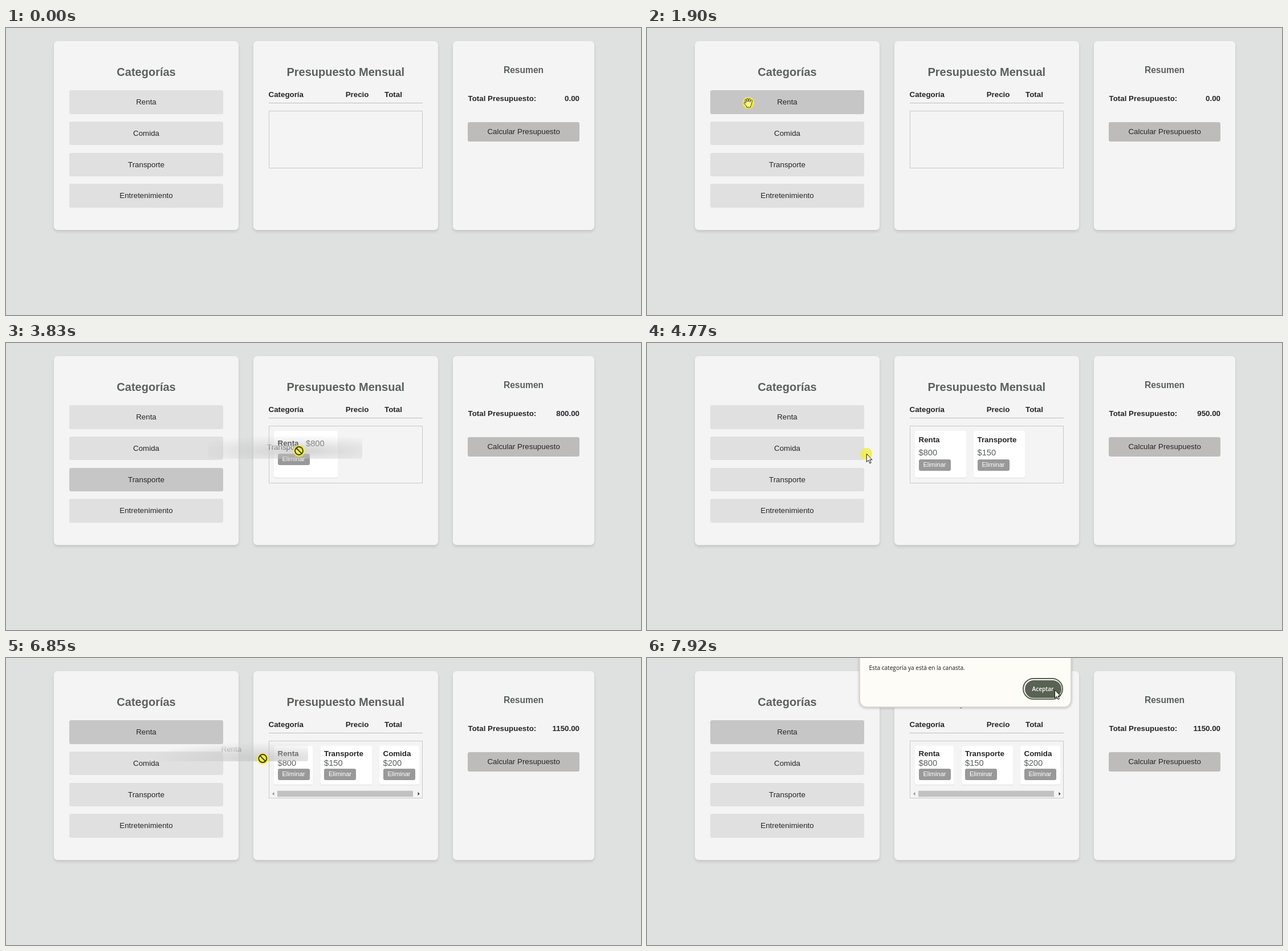
Animation, 1114 px wide and 503 px high, one loop 7.99 s. Source, as an HTML page:

```html
<!DOCTYPE html>
<html lang="es">
<head>
<meta charset="utf-8">
<title>Presupuesto</title>
<style>
html, body { margin: 0; width: 100%; height: 100%; overflow: hidden; }
body { background: #dfe1e0; color: #252528; font: 13.333px/16px "Liberation Sans", Arial, sans-serif; }
#stage { position: relative; width: 1114px; height: 503px; overflow: hidden; background: #dfe1e0; }
#stage div, #stage span, #stage svg { position: absolute; box-sizing: border-box; white-space: nowrap; }
.panel { top: 23.3px; width: 323.5px; height: 330.7px; border-radius: 6.7px; background: #f4f4f4; box-shadow: 0 3px 5px rgba(0,0,0,.12); }
.title { width: 100%; top: 42px; text-align: center; font: bold 20px/24px "Liberation Sans", Arial, sans-serif; color: #5b605d; }
.small { top: 38.5px; font-size: 15.6px; }
.row { left: 111px; width: 270px; height: 41.3px; border-radius: 3.3px; background: #e0e0e0; text-align: center; line-height: 41.3px; }
b { font-weight: bold; }
.head { top: 108.5px; font-weight: bold; }
.rule { left: 460.5px; top: 131px; width: 270.5px; height: 1px; background: #bdbdbd; }
.zone { left: 460.5px; top: 145px; width: 270.5px; height: 101px; border: 1px solid #c8c8c8; }
.calc { left: 810.4px; top: 164.7px; width: 195.5px; height: 34.5px; border-radius: 3.3px; background: #bdbcbb; text-align: center; line-height: 34.5px; }
#total { right: 108px; top: 116px; font-weight: bold; }
.card { top: 154px; border-radius: 3.3px; background: #fff; box-shadow: 0 1px 1px rgba(0,0,0,.1); }
.price { font-size: 14.667px; color: #5c5f5e; }
.del { left: 6.5px; width: 56px; height: 19.6px; border-radius: 3px; background: #999; color: #fff; font-size: 11.11px; line-height: 19.6px; text-align: center; }
#bar { left: 461.5px; top: 231px; width: 268.5px; height: 14px; }
#ghost { width: 270px; height: 41.3px; border-radius: 3.3px; background: #c4c4c4; text-align: center; line-height: 41.3px; }
#alert { left: 372px; top: -40px; width: 373px; height: 127px; border: 2px solid #d8d7d2; border-radius: 13px; background: #fdfcf7; box-shadow: 0 1px 4px rgba(0,0,0,.22); font: 10.1px/16px "Open Sans", "Noto Sans", sans-serif; color: #1c1c1a; }
#alert span { left: 15.5px; top: 47px; }
.ring { left: 285px; top: 73px; width: 71px; height: 38px; border: 2px solid #566050; border-radius: 19px; }
#ok { left: 1.5px; top: 1.5px; width: 64px; height: 31px; border-radius: 16px; color: #fff; font-weight: 600; line-height: 31px; text-align: center; }
#cursor { left: 0; top: 0; width: 60px; height: 60px; overflow: visible; }
</style>
</head>
<body>
<div id="stage">
  <div class="panel" style="left:84.3px"><div class="title">Categorías</div></div>
  <div class="panel" style="left:434px"><div class="title">Presupuesto Mensual</div></div>
  <div class="panel" style="left:784px;width:248px"><div class="title small">Resumen</div></div>
  <span class="head" style="left:460.5px">Categoría</span>
  <span class="head" style="left:595.7px">Precio</span>
  <span class="head" style="left:664px">Total</span>
  <div class="rule"></div>
  <div class="zone"></div>
  <span class="head" style="left:810.5px;top:116px">Total Presupuesto:</span>
  <span id="total"></span>
  <div class="calc">Calcular Presupuesto</div>
  <div id="rows"></div>
  <div id="cards"></div>
  <svg id="bar" viewBox="0 0 268.5 14">
    <rect x="14" y="1.7" width="238" height="10.6" fill="#c1c1c1"/>
    <path d="M8.3 4v6l-3.2-3z" fill="#8d8d8d"/>
    <path d="M260.5 4v6l3.2-3z" fill="#3a3a3a"/>
  </svg>
  <div id="ghost"></div>
  <div id="alert">
    <span>Esta categoría ya está en la canasta.</span>
    <div class="ring"><div id="ok">Aceptar</div></div>
  </div>
  <svg id="cursor">
    <circle id="halo" r="10.5" fill="#f3ed3c" fill-opacity=".8"/>
    <g id="arrow" fill="#fff" stroke="#111">
      <path d="M.5 0V14.2L3.8 11.2L6.2 16.6L8.4 15.6L6 10.4H10.3Z"/>
      <g id="copy">
        <path d="M2.5 12.5h9v6h-9z" fill="none" stroke-dasharray="1.5 1"/>
        <path d="M8.5 16.5h8v8h-8zM12.5 18.5v4M10.5 20.5h4"/>
      </g>
    </g>
    <path id="hand" fill="#fbf78a" stroke="#45431c" stroke-linejoin="round" d="M-3 8L-3.5 6L-7.5 1.2q-.8-1.6.6-2q1-.2 2.2 1.6L-6-4.2q-.1-1.6 1.1-1.6q1 0 1.3 1.4L-2.7-1.5L-3-6q0-1.6 1.2-1.6q1.2 0 1.3 1.5L-.2-1.8L.5-6q.3-1.4 1.4-1.3q1.2.1 1.1 1.6L2.6-1.3L4.3-4.3q.7-1.2 1.7-.7q.9.5.5 1.7L5.4 2q-.4 2.5-1.6 4L3.5 8z"/>
    <path id="no" fill="none" stroke="#45420f" stroke-width="1.9" d="M-7 0a7 7 0 0 1 14 0a7 7 0 0 1-14 0M-4.9-4.9L4.9 4.9"/>
  </svg>
</div>
<script>
const LOOP = 7990, ALERT_AT = 7130, FIRST_ROW = 109.3, PITCH = 54.67;
const $ = id => document.getElementById(id);
const names = ['Renta', 'Comida', 'Transporte', 'Entretenimiento'];
const items = [['Renta', 800], ['Transporte', 150], ['Comida', 200]];
const drops = [2780, 4200, 5950];

// time, x, y
const path = [
  [650, 673, 475], [900, 520, 290], [1130, 290, 90], [1210, 235, 70], [1310, 196, 80],
  [1420, 188, 118], [1490, 178, 131], [2000, 178, 131], [2230, 511, 159], [2650, 511, 199],
  [2780, 540, 200], [3070, 580, 200], [3200, 520, 205], [3480, 270, 246], [3600, 270, 246],
  [3830, 514, 189], [3900, 514, 189], [4200, 610, 195], [4400, 570, 200], [4700, 426, 200],
  [4910, 304, 183], [5510, 304, 183], [5700, 636, 182], [5950, 636, 182], [6100, 620, 186],
  [6580, 301, 146], [6720, 301, 146], [6850, 450, 176], [7060, 520, 190], [7130, 530, 185],
  [7510, 626, 85], [7750, 715, 56]
];
const shapes = [
  [650, 'arrow'], [1400, 'hand'], [2780, 'arrow'], [3440, 'hand'], [3620, 'no'], [4050, 'copy'],
  [4200, 'arrow'], [4870, 'hand'], [5520, 'no'], [5640, 'copy'], [5950, 'arrow'],
  [6530, 'hand'], [6730, 'no'], [7000, 'copy'], [7060, 'arrow']
];
// start, end, row
const hovers = [[1400, 2780, 0], [3440, 4200, 2], [4870, 5950, 1], [6530, LOOP, 0]];
const drags = [[2000, 2780, 0], [3600, 4200, 2], [5510, 5950, 1], [6720, 7060, 0]];

// card boxes and line positions for one, two and three cards
const layouts = [
  { boxes: [[470, 112]], height: 82, name: 14, price: [56, 14], del: 40 },
  { boxes: [[470, 90], [573, 90]], height: 82, name: 8, price: [6.5, 29.5], del: 50 },
  { boxes: [[470, 68], [551.5, 90.5], [655, 70]], height: 68, name: 5.5, price: [6.5, 22], del: 40.3 }
];

const clamp = v => Math.max(0, Math.min(1, v));
const mix = (a, b, k) => a + (b - a) * k;
const show = (id, on) => { $(id).style.display = on ? '' : 'none'; };

function at(t) {
  const i = path.findIndex(p => p[0] > t);
  if (i < 0) return path[path.length - 1].slice(1);
  if (i === 0) return path[0].slice(1);
  const a = path[i - 1], b = path[i], k = (t - a[0]) / (b[0] - a[0]);
  return [mix(a[1], b[1], k), mix(a[2], b[2], k)];
}

$('rows').innerHTML = names.map((n, i) =>
  `<div class="row" style="top:${FIRST_ROW + i * PITCH}px">${n}</div>`).join('');
const rows = [...$('rows').children];

let count = -1;
function setCards(n) {
  if (n === count) return;
  count = n;
  const sum = items.slice(0, n).reduce((s, it) => s + it[1], 0);
  $('total').textContent = sum.toFixed(2);
  show('bar', n === 3);
  const l = layouts[n - 1];
  $('cards').innerHTML = !l ? '' : l.boxes.map(([x, w], i) =>
    `<div class="card" style="left:${x}px;width:${w}px;height:${l.height}px">
      <span style="left:6.5px;top:${l.name}px"><b>${items[i][0]}</b></span>
      <span class="price" style="left:${l.price[0]}px;top:${l.price[1]}px">$${items[i][1]}</span>
      <div class="del" style="top:${l.del}px">Eliminar</div></div>`).join('');
}

function drawGhost(t, x, y) {
  const drag = drags.find(d => t > d[0] && t < d[1]);
  show('ghost', drag);
  if (!drag) return;
  const [px, py] = at(drag[0]);
  const dx = px - 111, dy = py - FIRST_ROW - drag[2] * PITCH;
  const g = $('ghost'), s = g.style;
  g.textContent = names[drag[2]];
  s.left = x - dx + 'px';
  s.top = y - dy + 'px';
  s.maskImage = s.webkitMaskImage =
    `radial-gradient(200px 28px at ${dx}px ${dy}px, rgba(0,0,0,.76), transparent)`;
}

function draw(t) {
  const [x, y] = at(t);
  setCards(drops.filter(d => t >= d).length);
  rows.forEach((row, i) => {
    let k = 0;
    for (const [from, to, r] of hovers)
      if (r === i) k = Math.max(k, Math.min(clamp((t - from) / 150), 1 - clamp((t - to) / 150)));
    const g = Math.round(mix(224, 198, k));
    row.style.background = `rgb(${g},${g},${g})`;
  });
  drawGhost(t, x, y);

  const open = t >= ALERT_AT;
  show('alert', open);
  $('ok').style.background = x > 662 && open ? '#596253' : '#4b5545';

  const shape = (shapes.filter(s => t >= s[0]).pop() || [])[1];
  show('cursor', shape);
  show('halo', !open);
  show('arrow', shape === 'arrow' || shape === 'copy');
  for (const id of ['copy', 'hand', 'no']) show(id, shape === id);
  $('cursor').style.transform = `translate(${x}px,${y}px)`;
}

const start = performance.now();
function tick() {
  draw((performance.now() - start) % LOOP);
  requestAnimationFrame(tick);
}
tick();
</script>
</body>
</html>
```
